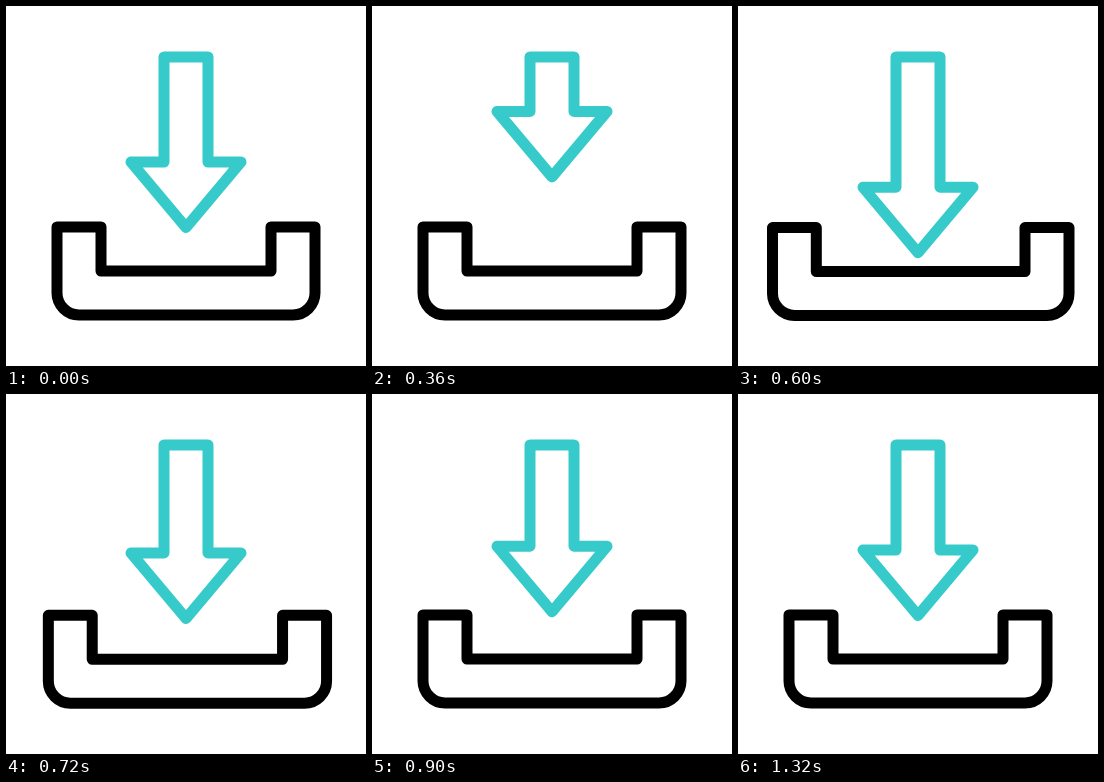
Animation, 360 px wide and 360 px high, one loop 1.35 s. Source, as an HTML page:

```html
<!DOCTYPE html>
<html lang="en">
<head>
<meta charset="utf-8">
<title>Download</title>
<style>
  html, body { margin: 0; width: 100%; height: 100%; overflow: hidden; background: #fff; }
  svg { display: block; width: 100vw; height: 100vh; }
  path {
    fill: none;
    stroke-width: 11;
    stroke-linejoin: round;
    animation: 1350ms cubic-bezier(.333, 0, .667, 1) infinite;
  }
  .tray { stroke: #000; animation-name: spread; }
  .arrow { stroke: #36cbca; animation-name: pump; }

  /* The shaft stretches while the head keeps its shape. */
  @keyframes pump {
    0%, 93.333%, 100% { d: path("M158 51H202V156H235L180 221.5L125 156H158Z"); }
    24.444% { d: path("M158 51H202V102.5H235L180 168L125 102.5H158Z"); }
    44.444% { d: path("M158 51H202V181.2H235L180 246.7L125 181.2H158Z"); }
    57.778% { d: path("M158 51H202V151.5H235L180 217L125 151.5H158Z"); }
  }

  /* The impact pushes both ends of the tray outwards. */
  @keyframes spread {
    0%, 33.333%, 63%, 100% {
      d: path("M51 221H95V265H265V221H309V287C309 299 299 309 287 309H73C61 309 51 299 51 287Z");
    }
    44.444% {
      d: path("M34.5 221.6H78.3V265.6H287V221.6H331V287.6C331 299.6 321 309.4 309 309.4H56.5C44.5 309.4 34.5 299.6 34.5 287.6Z");
    }
  }
</style>
</head>
<body>
<svg viewBox="0 0 360 360">
  <path class="tray" d="M51 221H95V265H265V221H309V287C309 299 299 309 287 309H73C61 309 51 299 51 287Z"/>
  <path class="arrow" d="M158 51H202V156H235L180 221.5L125 156H158Z"/>
</svg>
</body>
</html>
```
